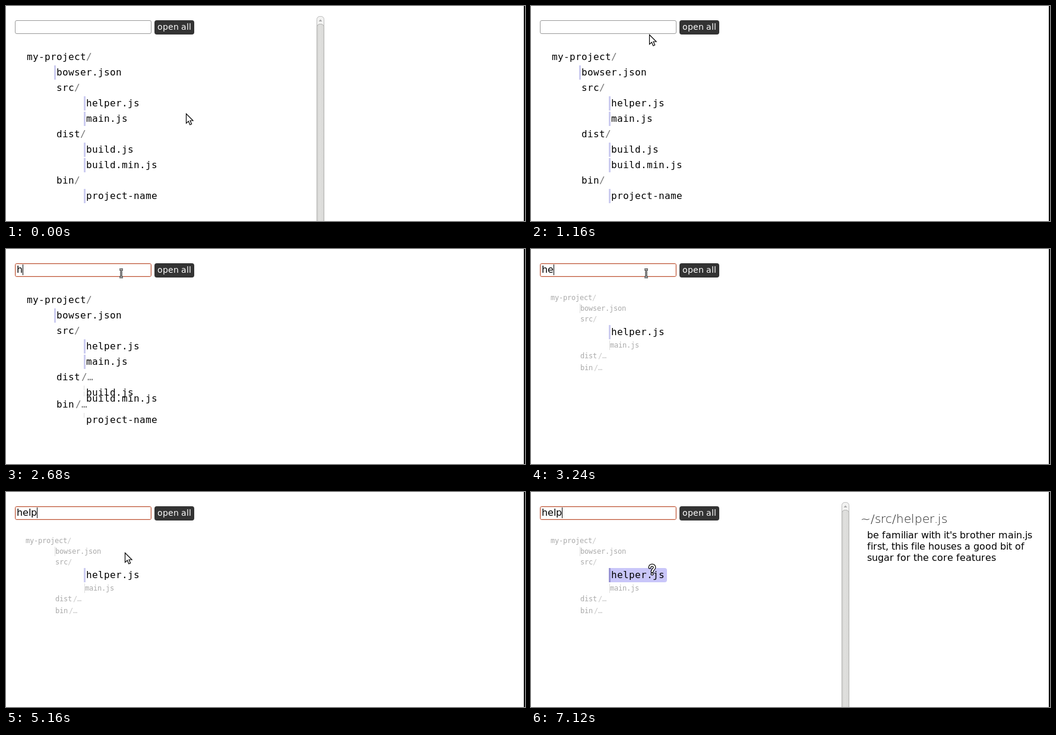
An HTML page with a canvas that plays this animation: 874 px wide and 362 px high, repeating every 7840 ms.

```html
<!DOCTYPE html>
<html>
<head>
<meta charset="utf-8">
<style>
  html, body { margin: 0; width: 100%; height: 100%; overflow: hidden; background: #fff; }
  canvas { display: block; }
</style>
</head>
<body>
<canvas id="stage" width="874" height="362"></canvas>
<script>
const ctx = document.getElementById('stage').getContext('2d');
const LOOP = 7840, STEP = 40;
const SANS = '"DejaVu Sans", sans-serif', MONO = '"DejaVu Sans Mono", monospace';

const TREE = [
  { name: 'my-project', depth: 0, dir: true },
  { name: 'bowser.json', depth: 1 },
  { name: 'src', depth: 1, dir: true },
  { name: 'helper.js', depth: 2, match: true },
  { name: 'main.js', depth: 2 },
  { name: 'dist', depth: 1, dir: true, folds: true },
  { name: 'build.js', depth: 2, hidden: true },
  { name: 'build.min.js', depth: 2, hidden: true },
  { name: 'bin', depth: 1, dir: true, folds: true },
  { name: 'project-name', depth: 2, hidden: true }
];
const KEYS = [2680, 3240, 3880, 4240];

const mix = (a, b, p) => a + (b - a) * p;
const progress = (t, from, to) => Math.min(1, Math.max(0, (t - from) / (to - from)));
const smooth = p => p * p * (3 - 2 * p);
const easeOut = p => 1 - (1 - p) ** 2;
const rgb = (a, b, p) => `rgb(${a.map((v, i) => Math.round(mix(v, b[i], p)))})`;
const gray = (a, b, p) => rgb([a, a, a], [b, b, b], p);

// Text on whole-pixel advances; returns the end position.
function text(str, x, y, font, color) {
  ctx.font = font;
  ctx.fillStyle = color;
  for (const ch of str) {
    ctx.fillText(ch, x, y);
    x += Math.round(ctx.measureText(ch).width);
  }
  return x;
}

function box(x, y, w, h, radius, fill, stroke) {
  ctx.beginPath();
  ctx.roundRect(x, y, w, h, radius);
  ctx.fillStyle = fill;
  ctx.fill();
  if (stroke) {
    ctx.lineWidth = 1;
    ctx.strokeStyle = stroke;
    ctx.stroke();
  }
}

function outlined(path, outer, inner) {
  for (const [width, color] of [[outer, '#000'], [inner, '#fff']]) {
    ctx.lineWidth = width;
    ctx.strokeStyle = color;
    ctx.stroke(path);
  }
}

const cursors = {
  arrow() {
    const p = new Path2D('M.5 .5V16.5L4.3 13L6.8 19L9.6 17.8L7.1 12H12Z');
    ctx.fillStyle = '#fff';
    ctx.fill(p);
    ctx.lineWidth = 1.2;
    ctx.strokeStyle = '#000';
    ctx.stroke(p);
  },
  beam() {
    outlined(new Path2D('M-3 -6.5H3M-3 6.5H3M0 -6.5V6.5'), 3, 1);
  },
  help() {
    ctx.lineCap = ctx.lineJoin = 'round';
    outlined(new Path2D('M-4 -4C-4 -9 4 -9 4 -4C4 -1 0 -1 0 3M0 7V7.1'), 5, 2.6);
  }
};

function drawCursor(t) {
  let shape = 'arrow', x, y, p;
  if (t < 1200) {
    p = smooth(progress(t, 360, 1160));
    [x, y] = [mix(303, 199, p), mix(181, 48, p)];
  } else if (t < 4800) {
    shape = 'beam';
    p = easeOut(progress(t, 1160, 1400));
    [x, y] = [mix(199, 194, p), mix(47, 41, p)];
  } else {
    p = smooth(progress(t, 4800, 5400));
    [x, y] = [mix(192, 204, p), mix(49, 131, p)];
    if (y >= 128) shape = 'help';
  }
  ctx.save();
  ctx.translate(Math.round(x), Math.round(y));
  cursors[shape]();
  ctx.restore();
}

function drawSearch(t) {
  const focused = t >= 1600;
  const typed = 'help'.slice(0, KEYS.filter(k => t >= k).length);
  box(15.5, 24.5, 229, 22, 2.5, '#fff', focused ? '#bd5335' : '#999');
  if (focused) box(16.5, 25.5, 227, 20, 1.5, '#fff', '#f0d5cb');
  const end = text(typed, 18, 40, '16px ' + SANS, '#000');
  if (focused && !(t >= 5680 && t < 7120)) {
    ctx.fillStyle = '#000';
    ctx.fillRect(end, 26, 1, 18);
  }
  box(250, 24, 67, 24, 4, '#333');
  text('open all', 255, 40, '14px ' + SANS, '#fff');
}

function drawTree(t, hover) {
  const filtering = t >= KEYS[0];
  const fold = smooth(progress(t, 2680, 2960));
  let top = 73;
  for (const { name, depth, dir, match, folds, hidden } of TREE) {
    const p = match ? 0 : fold;
    const line = mix(26, 18, p);
    const height = hidden && filtering ? mix(10, 1, p) : line;
    const x = Math.round(35 + 50 * depth - 2 * p);
    const baseline = Math.round(top + line / 2 + mix(5, 4, p));
    const font = mix(16, 12, p) + 'px ' + MONO;
    ctx.globalAlpha = hidden ? 1 - p : 1;

    if (match && hover) box(x - 4, top + 1, 98, 24, 4, '#c9c6f9');
    if (!dir && height > 2) {
      const thin = hidden && filtering;
      ctx.fillStyle = match && hover ? '#9a95d6' : rgb([204, 204, 240], [221, 221, 221], thin ? 1 : p);
      ctx.fillRect(mix(x - 4, x - 1, p), top + 1, thin ? 1 : mix(3, 1, p), height - 2);
    }
    const end = text(name, x, baseline, font, gray(0, 170, p));
    if (dir) {
      const folded = folds && filtering;
      text(folded ? '/…' : '/', end + (folded ? 2 : 0), baseline, font, gray(119, 200, p));
    }
    top += height;
  }
  ctx.globalAlpha = 1;
}

function drawPanel(t, hover) {
  ctx.globalAlpha = t < 4800 ? 1 - progress(t, 360, 560) : hover ? progress(t, 5160, 5360) : 0;
  const shade = ctx.createLinearGradient(523, 0, 536, 0);
  shade.addColorStop(0, '#d2d2d0');
  shade.addColorStop(.4, '#e0e0de');
  shade.addColorStop(1, '#d8d8d6');
  box(523.5, 17.5, 12, 30, 5, '#f3f3f2', '#bbb');
  box(523.5, 30.5, 12, 345, 5, shade, '#b0b0ae');
  ctx.fillStyle = '#aaa';
  ctx.fill(new Path2D('M526.5 26L529.5 22.5L532.5 26Z'));
  if (hover) {
    text('~/src/helper.js', 555, 52, '200 20px ' + SANS, '#222');
    ["be familiar with it's brother main.js", 'first, this file houses a good bit of', 'sugar for the core features']
      .forEach((line, i) => text(line, 566, 78 + 19 * i, '16px ' + SANS, '#000'));
  }
  ctx.globalAlpha = 1;
}

function draw(now) {
  const t = Math.floor(now % LOOP / STEP) * STEP;
  const hover = t >= 5200;
  ctx.fillStyle = '#fff';
  ctx.fillRect(0, 0, 874, 362);
  drawSearch(t);
  drawTree(t, hover);
  drawPanel(t, hover);
  ctx.fillStyle = '#000';
  ctx.fillRect(872, 0, 2, 362);
  drawCursor(t);
  requestAnimationFrame(draw);
}
requestAnimationFrame(draw);
</script>
</body>
</html>
```
